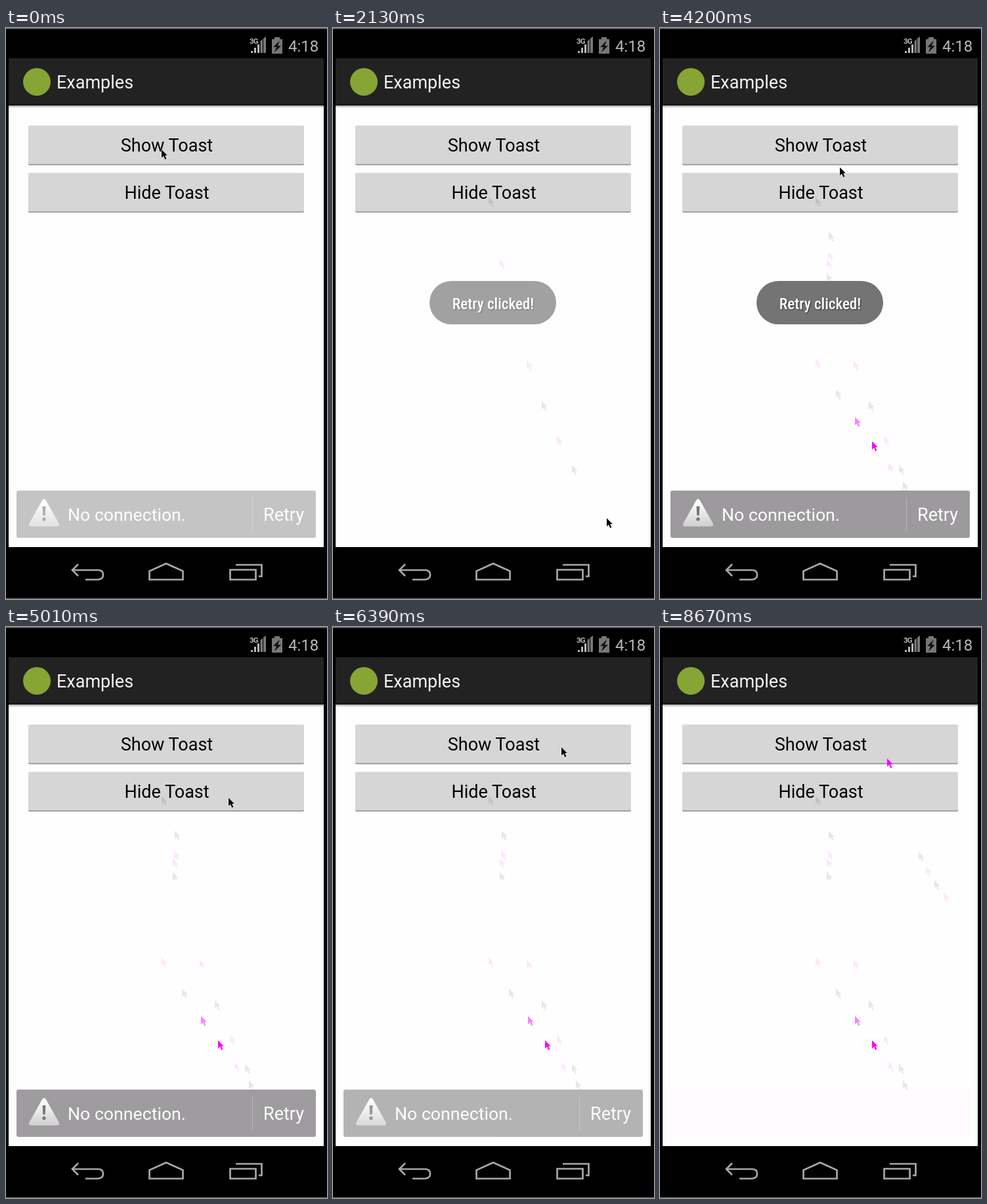
Recreate the animation shown at these times as an HTML page. Size 489 by 869 pixels, loop 9030 ms.

```html
<!DOCTYPE html>
<html lang="en">
<head>
<meta charset="utf-8">
<title>Toast example</title>
<style>
  html, body { margin: 0; width: 100%; height: 100%; overflow: hidden; background: #000; }
  svg { display: block; width: 489px; height: 869px; font: 27px Roboto, "Noto Sans", sans-serif; }
  .mid { text-anchor: middle; }
  .nav { fill: none; stroke: #a8a8a8; stroke-width: 2.7; }
  .key { fill: #d6d6d6; }
  .key.down { fill: #c5c3c6; }
  #retry { fill: #000; opacity: 0; }
  #retry.down { opacity: .15; }
  #pill text { font: 500 23px "Roboto Condensed", Roboto, sans-serif; font-stretch: 75%;
    text-shadow: 1px 1px 2px rgba(0, 0, 0, .75); }
</style>
</head>
<body>
<svg viewBox="0 0 489 869">
  <defs>
    <linearGradient id="shade" x2="0" y2="1">
      <stop stop-color="#aaa"/><stop offset="1" stop-color="#fefefe"/>
    </linearGradient>
    <linearGradient id="metal" x2="0" y2="1">
      <stop stop-color="#fff"/><stop offset="1" stop-color="#d2d2d2"/>
    </linearGradient>
    <path id="arrow" d="M0 0V12.5L3 9.8 5.2 15 7.4 14 5.2 9H8.8Z"/>
    <rect id="edge" x="34" y="149" width="420" height="59.7" rx="2" fill="#8b8b8b"/>
    <rect id="face" x="34" y="148.5" width="420" height="58.8" rx="2"/>
  </defs>

  <rect width="489" height="869"/>
  <path d="M0 .75H489M0 868.5H489" stroke="#686868" stroke-width="1.5"/>

  <!-- status bar -->
  <g fill="#b8b8b8">
    <text x="371" y="24" font-size="11.5" font-weight="700" letter-spacing="-.8">3G</text>
    <path d="M373 38V35H376V38ZM378 38V30H381V38ZM383 38V25H386V38Z"/>
    <path d="M387.5 38V20L391 17V38ZM392 38V16L396 13V38Z" fill="#777"/>
    <path d="M409 14H417V17H421V39H405V17H409Z" fill="#777"/>
    <path d="M417 19 407 29H412L409 37 419 27H414Z" fill="#111"/>
    <text x="430" y="36" font-size="24">4:18</text>
  </g>

  <!-- action bar -->
  <rect x="4" y="118" width="480" height="672" fill="#fefefe"/>
  <rect x="4" y="46" width="480" height="72" fill="#222"/>
  <rect x="4" y="115" width="480" height="3" fill="#191919"/>
  <rect x="4" y="118" width="480" height="4" fill="url(#shade)"/>
  <circle cx="47" cy="82" r="21" fill="#86a535"/>
  <text x="77" y="92" fill="#f3f3f3">Examples</text>

  <!-- buttons -->
  <g>
    <use href="#edge"/>
    <use id="show" class="key" href="#face"/>
    <text class="mid" x="245" y="188">Show Toast</text>
  </g>
  <g transform="translate(0 72)">
    <use href="#edge"/>
    <use id="hide" class="key" href="#face"/>
    <text class="mid" x="245" y="188">Hide Toast</text>
  </g>

  <g class="nav">
    <path d="M110 816 101 825 110 834M101 825H140Q148 825 148 832T140 839.5H121"/>
    <path d="M218.5 839.5V826.5L244 815 269.5 826.5V839.5Z"/>
    <path d="M341.5 824.5H380.5V839.5H341.5ZM350 817H389.5V834.5H385"/>
  </g>

  <g id="trail"></g>
  <rect id="pillWipe" x="147" y="385" width="193" height="66" rx="33" fill="#fefefe"/>
  <rect id="barWipe" x="16" y="704" width="456" height="72" fill="#fefefe"/>

  <g id="pill" fill="#fff">
    <rect x="147" y="385" width="193" height="66" rx="33" fill="#000" opacity=".6"/>
    <text class="mid" x="244" y="428">Retry clicked!</text>
  </g>

  <g id="bar" fill="#fff">
    <rect x="16" y="704" width="456" height="72" rx="3" fill="#9c9a9c"/>
    <rect id="retry" x="376" y="704" width="96" height="72"/>
    <path d="M58 720 38 755.5H78Z" fill="url(#metal)" stroke="url(#metal)" stroke-width="6" stroke-linejoin="round"/>
    <path d="M55.5 728H60.5L59.7 742H56.3Z" fill="#777"/>
    <circle cx="58" cy="747.5" r="2.7" fill="#777"/>
    <text x="94" y="750" font-size="26.7">No connection.</text>
    <path d="M375.5 715V765" stroke="#b8b6b8"/>
    <text x="392" y="750">Retry</text>
  </g>

  <use id="cursor" href="#arrow" stroke="#fff" stroke-width="1" paint-order="stroke"/>
</svg>

<script>
const LOOP = 9030, TICK = 30;
const FADE_IN = 300, FADE_OUT = 180, PILL_FADE = 400;
const el = id => document.getElementById(id);
const unit = v => Math.min(1, Math.max(0, v));

const linear = p => p;
const speedUp = p => p ** 1.3;
const slowDown = p => 1 - (1 - p) ** 1.5;

// Pointer strokes: each bends through `via` from where the last one ended.
// Stains are left from time `first` on, `gap` apart; the one numbered `peak` is vivid.
const home = { x: 237, y: 185 };
const strokes = [
  { start: 540, end: 660, to: { x: 237, y: 257 }, ease: speedUp },
  { start: 660, end: 1080, to: { x: 417, y: 746 }, via: { x: 284, y: 570 }, ease: slowDown,
    stains: 7, first: 660, gap: 45 },
  { start: 2220, end: 2460, to: { x: 237, y: 503 }, via: { x: 335, y: 655 }, ease: speedUp,
    stains: 8, first: 2250, peak: 4 },
  { start: 2460, end: 2760, to: { x: 257, y: 220 }, via: { x: 262, y: 360 }, ease: slowDown,
    stains: 3, first: 2560 },
  { start: 2760, end: 3030, to: { x: 273, y: 178 } },
  { start: 4080, end: 4320, to: { x: 277, y: 245 }, via: { x: 272, y: 213 }, stains: 1, first: 4320 },
  { start: 4320, end: 4560, to: { x: 339, y: 260 } },
  { start: 5580, end: 5940, to: { x: 348, y: 183 }, via: { x: 325, y: 220 } },
  { start: 6660, end: 6720, to: { x: 346, y: 200 }, stains: 1, first: 6720, peak: 0 },
  { start: 6720, end: 7050, to: { x: 470, y: 447 }, via: { x: 379, y: 361 }, stains: 4, first: 6885 },
  { start: 7110, end: 7230, to: { x: 474, y: 461 } }
];
strokes.forEach((s, i) => { s.from = i ? strokes[i - 1].to : home; });

function along({ start, end, from, to, via, ease = linear }, t) {
  const u = ease(unit((t - start) / (end - start))), v = 1 - u;
  const axis = k => {
    const mid = via ? via[k] : (from[k] + to[k]) / 2;
    return Math.round(v * v * from[k] + 2 * v * u * mid + u * u * to[k]);
  };
  return { x: axis("x"), y: axis("y") };
}

function pointer(t) {
  const s = strokes.filter(s => s.start <= t).pop();
  return s ? along(s, t) : home;
}

function move(node, { x, y }) {
  node.setAttribute("transform", `translate(${x} ${y})`);
}

function addStain(stroke, i) {
  const { first, gap = TICK, peak = Infinity } = stroke;
  const time = first + i * gap;
  const vivid = i < peak ? 0 : unit(1 - (i - peak) / 2);
  const node = document.createElementNS("http://www.w3.org/2000/svg", "use");
  node.setAttribute("href", "#arrow");
  node.setAttribute("fill", vivid || i % 2 ? "#f0f" : "#000");
  node.setAttribute("opacity", vivid || .09);
  move(node, along(stroke, time));
  el("trail").append(node);
  return { node, time };
}

const stains = strokes.flatMap(s =>
  Array.from({ length: s.stains || 0 }, (_, i) => addStain(s, i)));

const presses = {
  show: [[3360, 3510], [6150, 6240]],
  hide: [[4890, 5010]],
  retry: [[1650, 1860]]
};
const barShows = [[-105, 1860], [3510, 4980], [6240, 8490]];
const pillShows = [[1980, 4080]];

// decelerate in, accelerate out
function fade(t, shows, inLen, outLen) {
  return Math.max(...shows.map(([on, off]) =>
    (1 - (1 - unit((t - on) / inLen)) ** 2) * (1 - unit((t - off) / outLen) ** 2)));
}

const toggle = (node, on) => { node.style.visibility = on ? "visible" : "hidden"; };

function draw(now) {
  let t = Math.floor((now % LOOP) / TICK) * TICK;
  if (t < 60) t = 0;
  move(el("cursor"), pointer(t));
  toggle(el("cursor"), t < 7230);
  for (const { node, time } of stains) toggle(node, t > time);
  for (const id in presses)
    el(id).classList.toggle("down", presses[id].some(([a, b]) => t >= a && t < b));
  el("bar").style.opacity = fade(t, barShows, FADE_IN, FADE_OUT);
  el("pill").style.opacity = fade(t, pillShows, PILL_FADE, PILL_FADE);
  toggle(el("pillWipe"), t >= 1980);
  toggle(el("barWipe"), t >= 3510);
  el("barWipe").style.fill = t >= 8670 ? "#fffbff" : "#fefefe";
}

function loop() {
  draw(performance.now());
  requestAnimationFrame(loop);
}
loop();
</script>
</body>
</html>
```
